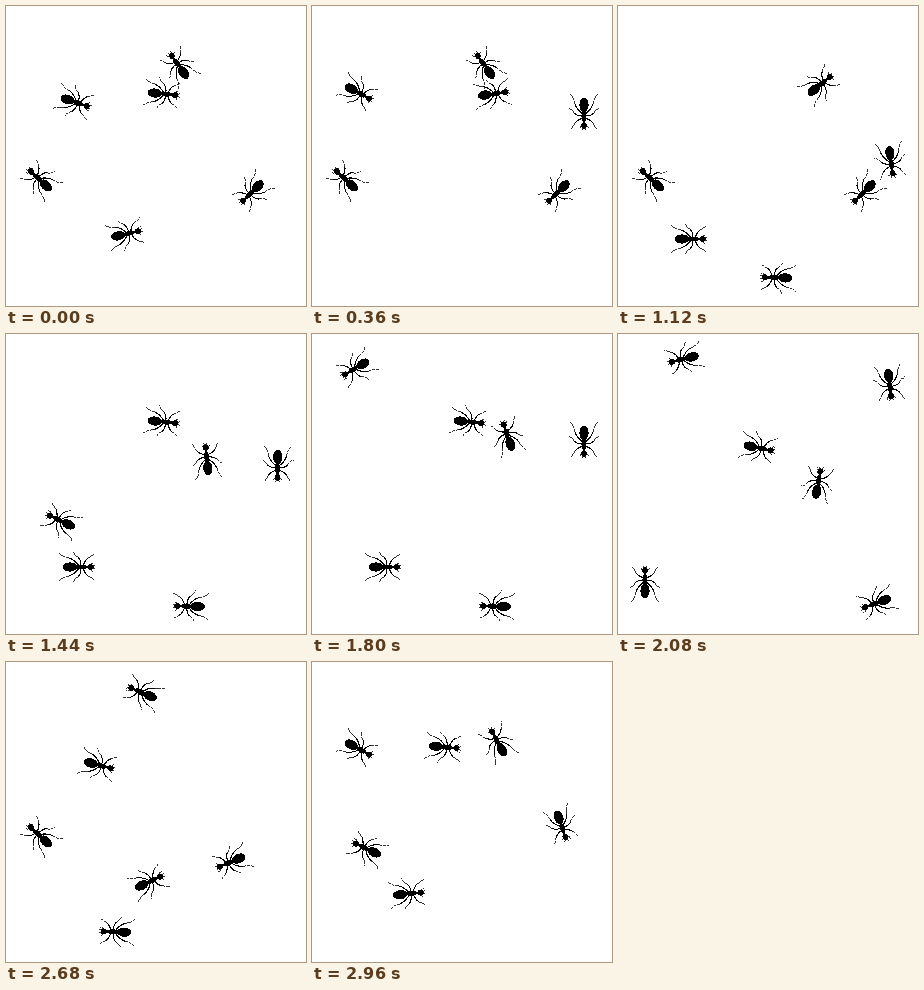
An HTML page for the animation above (3 s loop, 300x300 px).

```html
<!DOCTYPE html>
<html lang="en">
<head>
<meta charset="utf-8">
<title>Ants</title>
<style>
  html, body { margin: 0; width: 100%; height: 100%; overflow: hidden; background: #fff; }
  svg { display: block; width: 100vw; height: 100vh; }
  .leg { fill: none; stroke: #000; stroke-width: 1.1; }
  .foot { fill: none; stroke: #000; stroke-width: .8; stroke-dasharray: 3 .8; }
</style>
</head>
<body>
<svg viewBox="0 0 300 300" shape-rendering="crispEdges">
  <defs>
    <g id="side">
      <path class="leg" d="M5 1Q7 7 10 9M3 1Q3 7 0 10M1 1Q-3 7 -9 9"/>
      <path class="foot" d="M10 9L17 13M0 10Q-4 12 -5 16M-9 9Q-16 10 -19 14"/>
      <path class="foot" d="M13 2L14 4L16 4M15 1L17 2"/>
    </g>
    <g id="ant">
      <use href="#side"/>
      <use href="#side" transform="scale(1 -1)"/>
      <ellipse cx="-8" rx="7.2" ry="4.6"/>
      <ellipse cx="3.5" rx="5" ry="2.5"/>
      <path d="M-3 -1.2H13V1.2H-3Z"/>
      <ellipse cx="12.5" rx="3.1" ry="2.9"/>
    </g>
  </defs>
  <g id="colony"></g>
</svg>
<script>
const STEP = 40, LAP = 75, STRIDE = 24.6;
const delays = [6, 36, 44, 53, 62, 72];

// Bends of the closed trail: step, x, y, heading in degrees
const bends = [
  [0, 201, 126, -96], [3, 173, 60, -125], [7, 90, 22, 180], [9, 44, 34, 149],
  [11, 28, 71, 55], [13, 69, 96, 19], [20, 233, 143, 28], [22, 246, 186, 135],
  [24, 201, 206, 174], [30, 55, 187, 205], [31, 34, 174, 223], [38, 132, 85, 5],
  [41, 202, 79, -39], [44, 247, 21, -10], [48, 272, 107, 90], [50, 273, 155, 82],
  [54, 276, 253, 106], [56, 233, 273, 180], [63, 61, 268, 182], [65, 27, 249, 270],
  [67, 72, 233, 0], [69, 120, 228, -13]
];

// Cubic Hermite value and derivative
function hermite(a, b, m, n, u) {
  const c2 = 3 * (b - a) - 2 * m - n, c3 = m + n - 2 * (b - a);
  return [a + u * (m + u * (c2 + u * c3)), m + u * (2 * c2 + 3 * u * c3)];
}

// Ants leave each bend along its heading, at the same walking speed
function pose(step) {
  const i = bends.findLastIndex(bend => bend[0] <= step);
  const [s0, x0, y0, h0] = bends[i];
  const [s1, x1, y1, h1] = bends[(i + 1) % bends.length];
  const span = (s1 || LAP) - s0, reach = span * STRIDE, u = (step - s0) / span;
  const along = (a, b, trig) => {
    const pull = h => reach * trig(h * Math.PI / 180);
    return hermite(a, b, pull(h0), pull(h1), u);
  };
  const [x, dx] = along(x0, x1, Math.cos), [y, dy] = along(y0, y1, Math.sin);
  return `translate(${x} ${y}) rotate(${Math.atan2(dy, dx) * 180 / Math.PI})`;
}

const ants = delays.map(() => {
  const ant = document.createElementNS("http://www.w3.org/2000/svg", "use");
  ant.setAttribute("href", "#ant");
  return document.getElementById("colony").appendChild(ant);
});

const start = performance.now();
function draw() {
  const tick = Math.floor((performance.now() - start) / STEP);
  ants.forEach((ant, i) =>
    ant.setAttribute("transform", pose((tick + LAP - delays[i]) % LAP)));
  requestAnimationFrame(draw);
}
draw();
</script>
</body>
</html>
```
